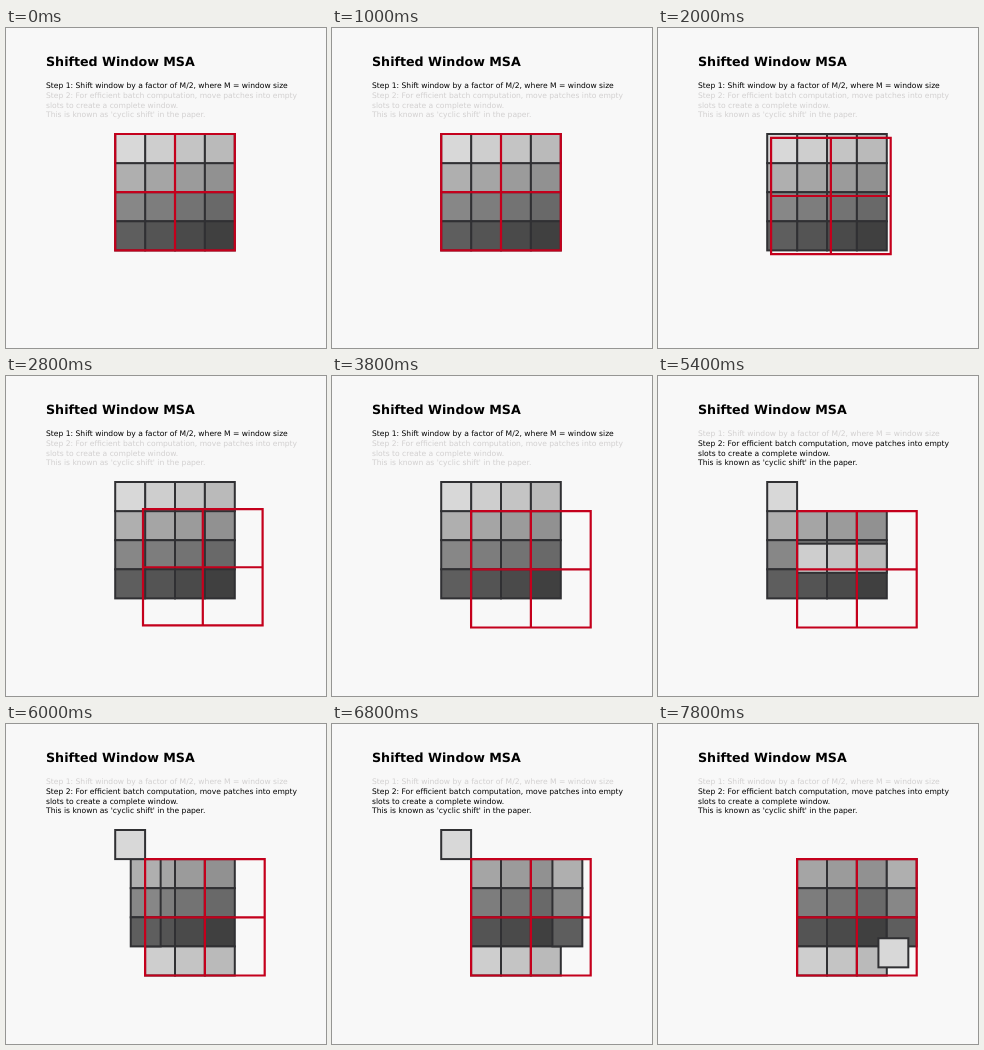
Recreate the animation shown at these times as an HTML page. Size 320 by 320 pixels, loop 8 s.

```html
<!DOCTYPE html>
<html lang="en">
<head>
<meta charset="utf-8">
<title>Shifted Window MSA</title>
<style>
  html, body { margin: 0; height: 100%; overflow: hidden; background: #f8f8f8; }
  svg { display: block; width: 100%; height: 100%; }
  text { font: 7.6px "DejaVu Sans", sans-serif; text-rendering: geometricPrecision; }
  .title { font-size: 12.67px; font-weight: bold; }
  #patches rect { stroke: #303033; stroke-width: 2; }
  #window { fill: none; stroke: #c4001c; stroke-width: 2.2; }
</style>
</head>
<body>
<svg viewBox="0 0 320 320">
  <text class="title" x="40" y="38.4">Shifted Window MSA</text>
  <text id="step1" x="40" y="60.3">Step 1: Shift window by a factor of M/2, where M = window size</text>
  <g id="step2">
    <text x="40" y="70">Step 2: For efficient batch computation, move patches into empty</text>
    <text x="40" y="79.5">slots to create a complete window.</text>
    <text x="40" y="89">This is known as 'cyclic shift' in the paper.</text>
  </g>
  <g id="patches"></g>
  <path id="window"/>
</svg>
<script>
const LOOP = 8000, TICK = 200, MOVE = 1000;
const TEXT_SWITCH = 3870;
const START = { window: 1870, row: 4870, column: 5870, corner: 6870 };
const N = 4, LEFT = 109.2, TOP = 106, CELL_W = 29.9, CELL_H = 29.1;
const ACTIVE = '#000', MUTED = '#d2d0d0';

const byId = id => document.getElementById(id);
const progress = (t, start) => Math.min(1, Math.max(0, (t - start) / MOVE));
const shift = (el, cols, rows) =>
  el.setAttribute('transform', `translate(${cols * CELL_W} ${rows * CELL_H})`);

function addElement(parent, tag, attributes = {}) {
  const el = document.createElementNS('http://www.w3.org/2000/svg', tag);
  for (const name in attributes) el.setAttribute(name, attributes[name]);
  return parent.appendChild(el);
}

// Later groups slide over earlier ones.
const groups = {};
for (const name of ['fixed', 'row', 'column', 'corner'])
  groups[name] = addElement(byId('patches'), 'g');

for (let i = 0; i < N * N; i++) {
  const col = i % N, row = Math.floor(i / N);
  const name = row ? (col ? 'fixed' : 'column') : (col ? 'row' : 'corner');
  const gray = Math.round(216 - i * 152 / 15);
  addElement(groups[name], 'rect', {
    x: LEFT + col * CELL_W, y: TOP + row * CELL_H,
    width: CELL_W, height: CELL_H, fill: `rgb(${gray},${gray},${gray})`
  });
}

const w = N * CELL_W, h = N * CELL_H;
byId('window').setAttribute('d',
  `M${LEFT} ${TOP}h${w}v${h}h${-w}zm${w / 2} 0v${h}m${-w / 2} ${-h / 2}h${w}`);

function draw(t) {
  const moved = progress(t, START.window);
  shift(byId('window'), moved, moved);
  shift(groups.row, 0, N * progress(t, START.row));
  shift(groups.column, N * progress(t, START.column), 0);
  const corner = N * progress(t, START.corner);
  shift(groups.corner, corner, corner);
  const second = t >= TEXT_SWITCH;
  byId('step1').setAttribute('fill', second ? MUTED : ACTIVE);
  byId('step2').setAttribute('fill', second ? ACTIVE : MUTED);
}

const origin = performance.now();
function frame() {
  const t = (performance.now() - origin) % LOOP;
  draw(Math.floor(t / TICK) * TICK);
  requestAnimationFrame(frame);
}
frame();
</script>
</body>
</html>
```
